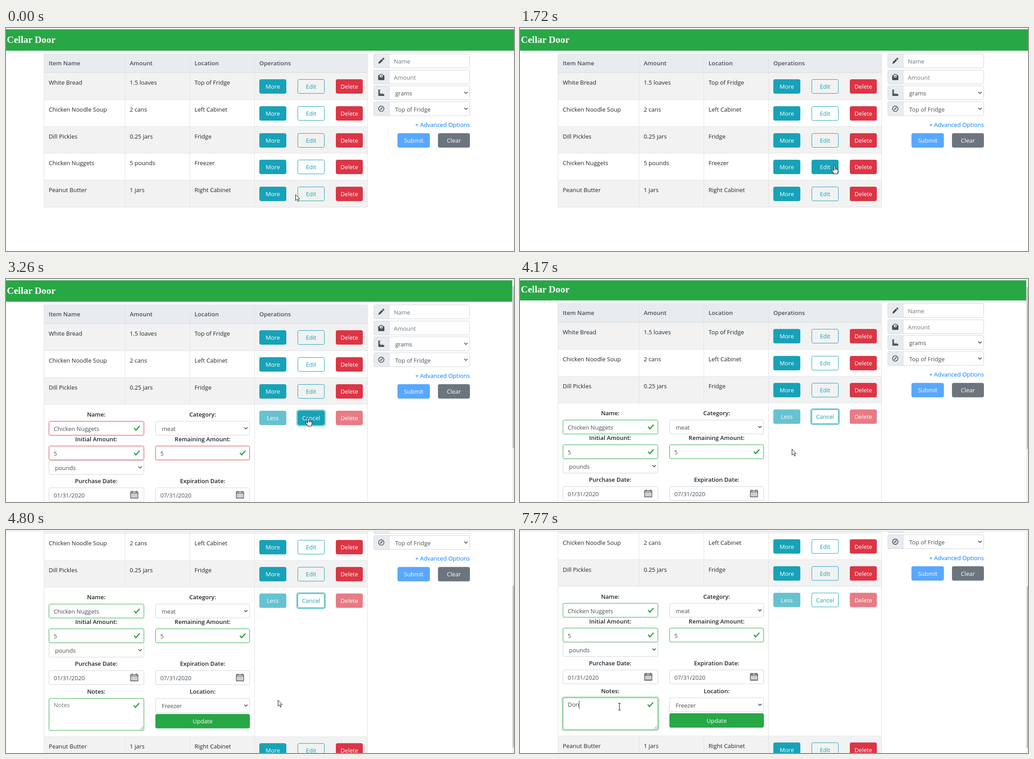
These frames come from a looping animation (1129x496 px, 8 s). An HTML page:

```html
<!DOCTYPE html>
<html lang="en">
<head>
<meta charset="utf-8">
<title>Cellar Door</title>
<style>
html, body { margin: 0; width: 100%; height: 100%; overflow: hidden; background: #fff; }
svg { display: block; width: 1129px; height: 496px; font: 13px "Open Sans", "Noto Sans", sans-serif; white-space: pre; }
.b { font-weight: 600; }
.brand { font: bold 21.3px "Liberation Serif", "Noto Serif", serif; }
</style>
</head>
<body>
<svg id="stage" viewBox="0 0 1129 496"></svg>
<script>
const LOOP = 8000;
const INK = '#212529', GREY = '#495057', PALE = '#6c757d', LINE = '#dee2e6', EDGE = '#ced4da';
const TEAL = '#17a2b8', RED = '#dc3545', GREEN = '#28a745';
const stage = document.getElementById('stage');

const items = [
  ['White Bread', '1.5 loaves', 'Top of Fridge'],
  ['Chicken Noodle Soup', '2 cans', 'Left Cabinet'],
  ['Dill Pickles', '0.25 jars', 'Fridge'],
  ['Chicken Nuggets', '5 pounds', 'Freezer'],
  ['Peanut Butter', '1 jars', 'Right Cabinet']
];
const columns = [95, 275, 419, 563];

// time, then values
const pointerPath = [
  [460, 643, 370], [620, 616, 364], [740, 606, 316], [860, 650, 286], [960, 702, 300],
  [1050, 740, 335], [1150, 690, 345], [1230, 652, 322], [1300, 656, 290],
  [1450, 645, 271], [1560, 672, 280], [1720, 699, 306], [1900, 690, 314], [2080, 668, 306],
  [2140, 668, 306], [2280, 672, 309], [3620, 672, 309], [3860, 604, 378],
  [5130, 604, 378], [5320, 480, 358], [5500, 320, 372], [5660, 221, 393]
];
const scrollPath = [
  [4169, 0], [4170, 2.5], [4250, 28], [4330, 76], [4400, 108], [4470, 127.4],
  [4600, 143], [4750, 151], [4920, 153.4]
];

function track(keys, t) {
  const n = keys.findIndex(k => k[0] > t);
  if (n === 0) return keys[0].slice(1);
  if (n < 0) return keys[keys.length - 1].slice(1);
  const a = keys[n - 1], b = keys[n], p = (t - a[0]) / (b[0] - a[0]);
  return a.slice(1).map((v, i) => v + (b[i + 1] - v) * p);
}
const ramp = (t, from, to) => Math.min(1, Math.max(0, (t - from) / (to - from)));

const rect = (x, y, w, h, fill, extra = '') =>
  `<rect x="${x}" y="${y}" width="${w}" height="${h}" fill="${fill}" ${extra}/>`;
const box = (x, y, w, h, fill, stroke) =>
  rect(x + .5, y + .5, w - 1, h - 1, fill, `rx="3" stroke="${stroke}"`);
const ring = (x, y, w, h, color, alpha) =>
  rect(x - 1.4, y - 1.4, w + 2.8, h + 2.8, 'none', `rx="4.5" stroke="${color}" stroke-width="2.8" opacity="${alpha}"`);
const text = (x, y, s, fill = INK, extra = '') => `<text x="${x}" y="${y}" fill="${fill}" ${extra}>${s}</text>`;
const label = (x, y, s) => text(x, y, s, INK, 'class="b" text-anchor="middle"');
const path = (d, fill, extra = '') => `<path d="${d}" fill="${fill}" ${extra}/>`;
const at = (x, y, body, scale = 1) => `<g transform="translate(${x} ${y}) scale(${scale})">${body}</g>`;

function button(x, y, w, s, color, { outline = false, alpha = 1, h = 32 } = {}) {
  return `<g opacity="${alpha}">` + box(x, y, w, h, outline ? 'none' : color, color) +
    text(x + w / 2, y + 21, s, outline ? color : '#fff', 'text-anchor="middle"') + '</g>';
}
const field = (x, y, w, s, { edge = EDGE, fill = GREY, h = 32 } = {}) =>
  box(x, y, w, h, '#fff', edge) + text(x + 11, y + 22, s, fill);
const select = (x, y, w, s) =>
  box(x, y, w, 32, '#fff', EDGE) + text(x + 14, y + 22, s, GREY) +
  path(`M${x + w - 12.5} ${y + 14}l3.6 3.6 3.6-3.6`, 'none', `stroke="${GREY}" stroke-width="1.7"`);

const tick = (x, y) => at(x - 7.6, y - 7.6, path('M2.3 6.73L.6 4.53c-.4-1.04.46-1.4 1.1-.8l1.1 1.4 3.4-3.8c.6-.63 1.6-.27 1.2.7l-4 4.6c-.43.5-.8.4-1.1.1z', GREEN), 1.9);
const alertMark = (x, y) => at(x, y,
  `<circle r="5.7" fill="none" stroke="${RED}" stroke-width="1.3"/>` +
  path('M0-3.2V1M0 2v1.7', 'none', `stroke="${RED}" stroke-width="1.4"`));

function calendar(x, y) {
  let dots = '';
  for (let r = 0; r < 3; r++)
    for (let c = 0; c < 5; c++) dots += rect(x - 6 + c * 2.6, y - 1.3 + r * 3, 1.3, 1.3, '#222');
  return path(`M${x - 8} ${y - 6.5}h16v14h-16zM${x - 8} ${y - 3.5}h16M${x - 4.5} ${y - 9}v4M${x + 4.5} ${y - 9}v4`,
    'none', 'stroke="#111" stroke-width="1.1"') + dots;
}

const icons = [
  path('M-6.5 6.5l1-4 6.7-6.7 3 3-6.7 6.7zM2-5l1.5-1.5q1-.8 2 .1l1 1q.8 1 0 1.8L5-2z', GREY),
  path('M-5-4h10q2 0 2 2v7q0 2-2 2h-10q-2 0-2-2v-7q0-2 2-2z', GREY) +
    `<circle cy="-2" r="4.8" fill="${GREY}"/><circle cy="-2" r="3.3" fill="#e9ecef"/>` +
    path('M-1.2 0L1-4l.6 3.5z', GREY),
  path('M-6.5-7h4v2h-2v1.2h2v2h-2v1.2h2V3H-1V1.2h1.4V3h1.8V1.2h1.4V3h3v4h-13z', GREY),
  `<circle r="6" fill="none" stroke="${GREY}" stroke-width="1.6"/>` +
    path('M3.5-3.5L1.3 1.3-3.5 3.5-1.3-1.3z', GREY) + '<circle r=".9" fill="#e9ecef"/>'
];

function addForm() {
  const rows = [57, 93, 128, 163.5];
  const parts = [
    field(851, rows[0], 180, 'Name', { fill: PALE }),
    field(851, rows[1], 180, 'Amount', { fill: PALE }),
    select(851, rows[2], 180, 'grams'),
    select(851, rows[3], 180, 'Top of Fridge')
  ];
  return rows.map((y, i) =>
    box(817, y, 37, 32, '#e9ecef', EDGE) + parts[i] + at(834, y + 16, icons[i])).join('') +
    text(1031, 220, '+ Advanced Options', '#007bff', 'text-anchor="end"') +
    button(870, 234, 72, 'Submit', '#007bff', { alpha: .65 }) +
    button(960, 234, 71, 'Clear', PALE);
}

function editForm(t) {
  const loaded = t >= 3260;
  const p = ramp(t, 3260, 3380);
  const edge = `rgb(${[[220, 40], [53, 167], [69, 69]].map(([a, b]) => Math.round(a + (b - a) * p))})`;
  const checked = (x, y, w, value, hint) =>
    field(x, y, w, loaded ? value : hint, { edge, fill: loaded ? GREY : PALE }) +
    (loaded ? tick : alertMark)(x + w - 16, y + 16);
  const date = (x, w, value) =>
    field(x, 464, w, loaded ? value : 'mm/dd/yyyy') + calendar(x + w - 22, 480);
  const note = t < 7360 ? '' : t < 7680 ? 'D' : t < 7770 ? 'Do' : 'Don';
  const caret = t >= 5840 && !(t >= 6380 && t < 6940);

  return label(200.5, 306, 'Name:') + label(437, 306, 'Category:') +
    checked(95, 316, 212, 'Chicken Nuggets', 'Name') + select(332, 316, 210, 'meat') +
    label(200.5, 361, 'Initial Amount:') + label(437, 361, 'Remaining Amount:') +
    checked(95, 371, 212, '5', 'Amount') + checked(332, 371, 210, '5', 'Amount') +
    select(95, 403, 212, loaded ? 'pounds' : 'grams') +
    label(200.5, 454, 'Purchase Date:') + label(437, 454, 'Expiration Date:') +
    date(95, 212, '01/31/2020') + date(332, 210, '07/31/2020') +
    label(200.5, 516, 'Notes:') + label(437, 516, 'Location:') +
    ring(95, 526, 212, 72, GREEN, .25 * ramp(t, 5840, 6000)) +
    box(95, 526, 212, 72, '#fff', GREEN) +
    text(106, 546, note || 'Notes', note ? GREY : PALE, 'id="note"') +
    (caret ? rect(106, 533.4, 1, 18, '#333', `id="caret" data-typed="${note}"`) : '') +
    tick(290, 542) +
    path('M298 596l7-7M302 596l3-3', 'none', 'stroke="#777"') +
    select(332, 526, 210, 'Freezer') + button(332, 561, 210, 'Update', GREEN);
}

function table(t, px, py) {
  const editing = t >= 2980;
  const top = i => editing && i > 3 ? 612 + (i - 4) * 60 : Math.round(100 + 59.75 * i);
  const end = top(5);
  let out = rect(84, 57, 720, 42, '#e9ecef'), hand = false;
  ['Item Name', 'Amount', 'Location', 'Operations'].forEach((s, i) =>
    out += text(columns[i], 83, s, GREY, 'class="b"'));

  items.forEach((item, i) => {
    const y = top(i), by = y + 14, open = editing && i === 3;
    const over = x => {
      const hit = px >= x && px < x + 60 && py >= by && py < by + 32;
      hand = hand || hit;
      return hit;
    };
    if (i % 2 === 0) out += rect(84, y, 720, top(i + 1) - y, '#f2f2f2');
    out += rect(84, y - 1, 720, 1, LINE);
    if (!open) item.forEach((s, c) => out += text(columns[c], y + 26, s));
    if (i === 3) {
      const focus = ramp(t, 2680, 2770) * (1 - ramp(t, 5840, 6000));
      out += ring(648, by, 60, 32, TEAL, .5 * focus);
    }
    const dim = open ? .65 : 1;
    out += button(563, by, 60, open ? 'Less' : 'More', over(563) && !open ? '#138496' : TEAL, { alpha: dim }) +
      button(648, by, 60, open ? 'Cancel' : 'Edit', TEAL, { outline: !over(648) }) +
      button(733, by, 60, 'Delete', over(733) && !open ? '#c82333' : RED, { alpha: dim });
  });

  out += rect(84, 57, 720, 1, LINE) + rect(84, 98, 720, 2, LINE) + rect(84, end - 1, 720, 1, LINE);
  [84, 552, 803].forEach(x => out += rect(x, 57, 1, end - 57, LINE));
  [264, 408].forEach(x => {
    out += rect(x, 57, 1, (editing ? 279 : end) - 57, LINE);
    if (editing) out += rect(x, 612, 1, end - 612, LINE);
  });
  if (editing) out += editForm(t);
  return { out, hand };
}

function pointer(x, y, kind) {
  const line = 'stroke="#111" stroke-width="1" stroke-linejoin="round"';
  const shapes = {
    arrow: path('M.5.5v13.3l3.1-2.9 2.2 5 2.1-.9-2.2-4.9h4.2z', '#fff', line),
    hand: path('M-1.5 11V1.4a1.4 1.4 0 0 1 2.8 0V6.5q1.3-1 2.5.3 1.4-.8 2.3.5 1.9-.3 1.9 1.5V12q0 3-1.5 4v2.3H-1.5V17q-1.6-2-3.8-5.5-1.1-2.3.7-2.2 1.4.1 3.1 2.2zM1.3 6.5V10M3.8 7v3M6.1 7.5V10', '#fff', line),
    beam: path('M-3-7.5h2q1 0 1 1 0-1 1-1h2M0-6.5v13M-3 7.5h2q1 0 1-1 0 1 1 1h2', 'none', 'stroke="#222" stroke-width="1.2"')
  };
  return at(x, y, shapes[kind]);
}

function draw(t) {
  const [x, y] = track(pointerPath, t);
  const [scroll] = track(scrollPath, t);
  const grid = table(t, x, y + scroll);
  const inNotes = t > 5000 && x < 307 && y >= 373;
  const scrollbar = rect(1125, 3, 4, 493, '#f1f1f1') + rect(1126, 16 + scroll * .712, 3, 360, '#c1c1c1');

  stage.innerHTML = at(0, -scroll,
    rect(0, 3, 1129, 47.5, GREEN) + text(2, 33, 'Cellar Door', '#fff', 'class="brand"') +
    grid.out + addForm()) +
    (t >= 2980 ? scrollbar : '') +
    rect(0, 0, 1129, 3, '#f2f2f2') + rect(0, 2, 1129, 1, '#e6e6e6') +
    pointer(x, y, grid.hand ? 'hand' : inNotes ? 'beam' : 'arrow');

  const caret = document.getElementById('caret');
  if (caret && caret.dataset.typed)
    caret.setAttribute('x', Math.round(106 + document.getElementById('note').getComputedTextLength()));
}

const start = performance.now();
function frame(now) {
  draw(Math.max(0, now - start) % LOOP);
  requestAnimationFrame(frame);
}
draw(0);
requestAnimationFrame(frame);
</script>
</body>
</html>
```
